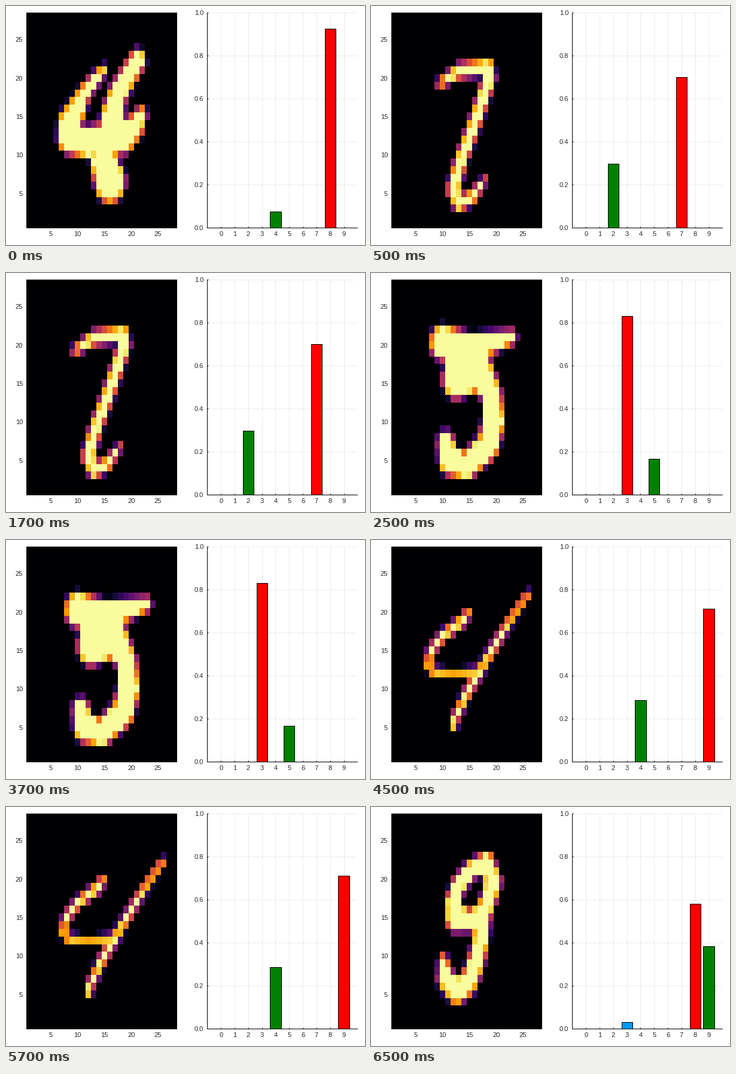
Recreate the animation shown at these times as a matplotlib script. Size 600 by 400 pixels, loop 8000 ms.

```python
import matplotlib.pyplot as plt
import numpy as np
from itertools import pairwise
from matplotlib.animation import FuncAnimation

WIDTH, HEIGHT, DPI = 600, 400, 100
GRID = 28
PX = 72 / DPI
RED, GREEN, BLUE = "#ff0000", "#008000", "#009afa"

plt.rcParams.update({"font.family": "Liberation Sans", "font.size": 8})

COLS, ROWS = np.meshgrid(np.arange(1, GRID + 1), np.arange(1, GRID + 1))


def segment_ink(start, end):
    """Soft coverage of a straight pen stroke whose radius varies linearly."""
    (x0, y0, r0), (x1, y1, r1) = start, end
    dx, dy = x1 - x0, y1 - y0
    t = ((COLS - x0) * dx + (ROWS - y0) * dy) / (dx * dx + dy * dy)
    t = np.clip(t, 0, 1)
    distance = np.hypot(COLS - x0 - t * dx, ROWS - y0 - t * dy)
    return np.clip(r0 + t * (r1 - r0) - distance + 0.5, 0, 1)


def digit(*strokes):
    """Grey levels of a digit; a stroke is a path of (x, y, pen radius)."""
    ink = [segment_ink(a, b) for path in strokes for a, b in pairwise(path)]
    return 0.99 * np.max(ink, axis=0)


wide_four = digit(
    [(14.7, 21, 0.7), (11.2, 18, 1.15), (8.6, 14, 2.2), (8.4, 12.2, 2.1),
     (12, 11.6, 2.1), (18.5, 12.4, 2.3), (20.5, 13.5, 1.7), (21.8, 15.2, 1.05)],
    [(21.2, 22.3, 1.45), (17.5, 18, 1.65), (16.6, 15.5, 2), (14.7, 9, 2.3),
     (16, 6.6, 2.9)],
)
curled_seven = digit(
    [(9.6, 19.3, 0.6), (13, 20.9, 0.95), (18.5, 21.5, 1), (18.7, 20, 1.15),
     (16.4, 15, 1.1), (13.3, 9, 1.1), (12, 5.5, 1.15), (13, 3.6, 1),
     (15.5, 4.5, 0.9), (17.8, 6.7, 0.4)],
)
heavy_five = digit(
    [(10, 20.3, 2.3), (15, 19.5, 2), (22.8, 21, 0.95)],
    [(13.7, 17.7, 3.8), (12.5, 15.5, 2.5), (17, 16.5, 2.4), (19.2, 13.5, 1.75),
     (19.5, 10, 2), (18.5, 7, 2), (14.5, 4.2, 1.75), (11.3, 5, 2),
     (10.6, 7.3, 1.5)],
)
slim_four = digit(
    [(25.8, 22.2, 0.5), (22.6, 19, 0.6), (15, 10, 0.75), (12.2, 6, 0.65),
     (12.1, 5.2, 0.6)],
    [(14.7, 19.8, 0.6), (13.3, 18.6, 0.8), (10.3, 17, 0.7), (7.9, 15, 0.65),
     (7.3, 13.2, 0.65), (8.3, 12.2, 0.6), (12, 12.05, 0.35), (16.5, 12.2, 0.6)],
)
leaning_nine = digit(
    [(18.2, 22.1, 1.4), (15.3, 21.2, 1.2), (12.8, 19, 1.25), (12, 16.8, 1.45),
     (12.5, 15, 1.9), (15, 14.6, 1.4), (17.3, 15.2, 1.6), (18.4, 17, 1.4),
     (19.4, 19.7, 1.55), (18.2, 22.1, 1.4)],
    [(17.3, 15, 1.6), (17.1, 12, 1.45), (16.2, 9, 1.5), (14.8, 6.5, 1.6),
     (12.6, 5.4, 1.75), (10.6, 7, 1.5), (10.1, 9.3, 0.85)],
)

# Each scene pairs a digit with its bars: {label: (height, colour)}.
SCENES = [
    (wide_four, {4: (0.075, GREEN), 8: (0.925, RED)}),
    (curled_seven, {2: (0.299, GREEN), 7: (0.701, RED)}),
    (heavy_five, {3: (0.833, RED), 5: (0.167, GREEN)}),
    (slim_four, {4: (0.287, GREEN), 9: (0.713, RED)}),
    (leaning_nine, {3: (0.031, BLUE), 8: (0.583, RED), 9: (0.385, GREEN)}),
]

fig = plt.figure(figsize=(WIDTH / DPI, HEIGHT / DPI), dpi=DPI, facecolor="white")


def add_panel(left):
    ax = fig.add_axes([left / WIDTH, 28.6 / HEIGHT, 251 / WIDTH, 360 / HEIGHT])
    ax.spines[["top", "right"]].set_visible(False)
    ax.spines[["left", "bottom"]].set_linewidth(PX)
    ax.tick_params(direction="in", length=2.5 * PX, width=PX, labelcolor="#262626")
    ax.tick_params(axis="x", pad=5.6 * PX)
    ax.tick_params(axis="y", pad=6.4 * PX)
    return ax


digit_ax = add_panel(34.4)
image = digit_ax.imshow(
    wide_four, cmap="inferno", vmin=0, vmax=1, origin="lower",
    extent=(0.5, GRID + 0.5, 0.5, GRID + 0.5),
    aspect="auto", interpolation="nearest",
)
digit_ax.set_xticks(range(5, 26, 5))
digit_ax.set_yticks(range(5, 26, 5))

bar_ax = add_panel(336.4)
bars = bar_ax.bar(range(10), [0] * 10, width=0.8, edgecolor="black",
                  linewidth=PX, zorder=2)
bar_ax.set(xlim=(-1, 10), ylim=(0, 1), xticks=range(10),
           yticks=np.linspace(0, 1, 6))
bar_ax.set_axisbelow(True)
bar_ax.grid(color="#ebebeb", linewidth=PX)


def update(frame):
    # The opening scene lasts one step, the others up to four.
    cells, heights = SCENES[(frame + 3) // 4]
    image.set_data(cells)
    for label, bar in enumerate(bars):
        height, color = heights.get(label, (0, BLUE))
        bar.set_height(height)
        bar.set_facecolor(color)
    return [image, *bars]


anim = FuncAnimation(fig, update, frames=16, interval=500, repeat=True)
plt.show()
```
